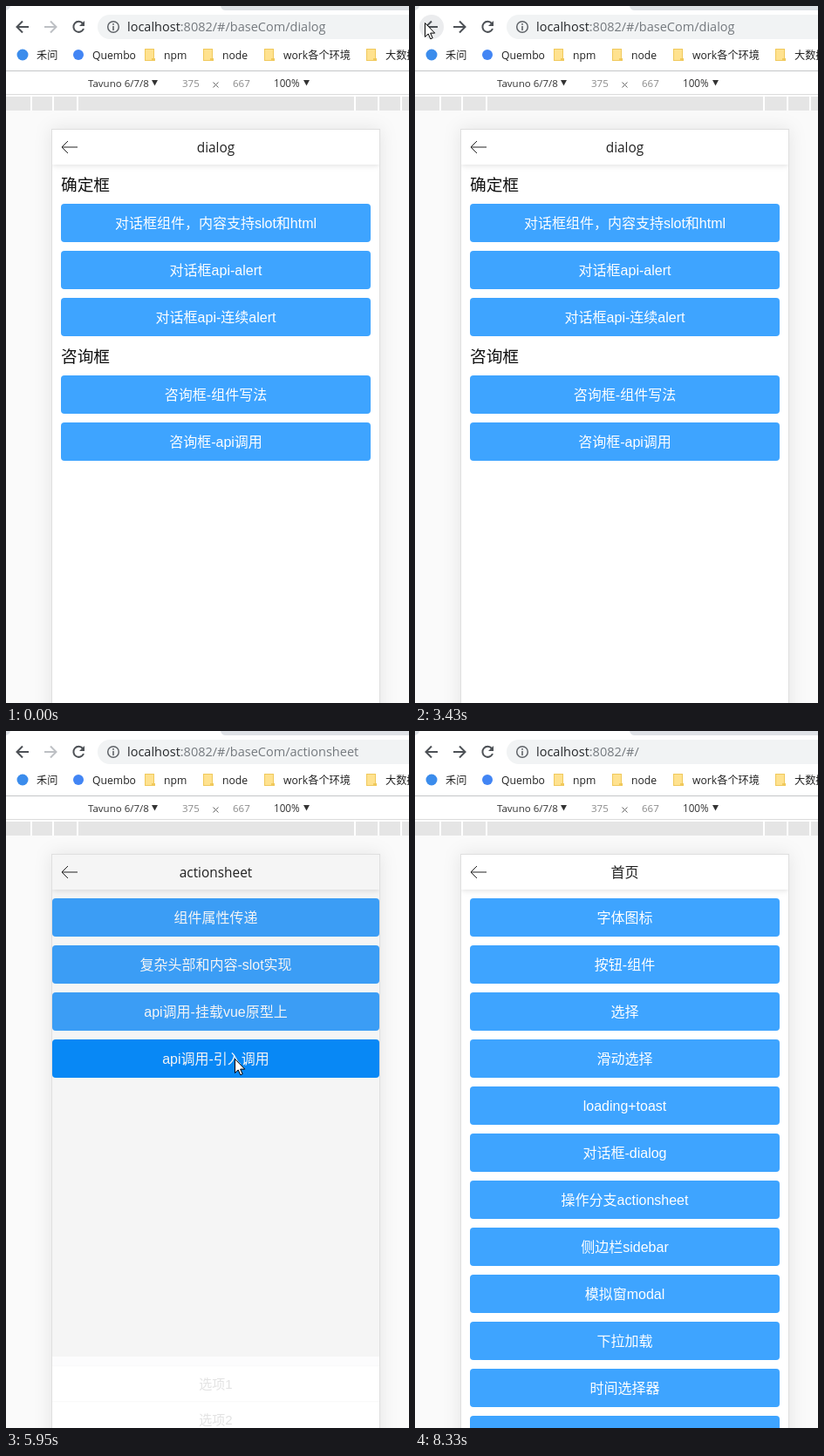
An HTML page for the animation above (9240 ms loop, 462 by 800 pixels).

```html
<!DOCTYPE html>
<html lang="zh">
<head>
<meta charset="utf-8">
<title>dialog</title>
<style>
html, body { margin: 0; width: 100%; height: 100%; overflow: hidden; background: #fff; }
svg { display: block; }
text { font-family: "Liberation Sans", "Noto Sans CJK SC", "Noto Sans CJK", sans-serif; white-space: pre; }
.ui { font-family: "Open Sans", "Noto Sans CJK SC", "Noto Sans CJK", sans-serif; }
.device { filter: drop-shadow(0 0 10px rgba(0,0,0,.09)); }
.header { filter: drop-shadow(0 1px 3px rgba(0,0,0,.13)); }
</style>
</head>
<body>
<svg id="stage" width="462" height="800" viewBox="0 0 462 800"></svg>
<script>
const LOOP = 9240, STEP = 70, FADE = 300, MID = 240.5;
const BLUE = '#3ea4ff', PRESSED = '#098eff';

const rect = (x, y, w, h, fill, extra = '') =>
  `<rect x="${x}" y="${y}" width="${w}" height="${h}" fill="${fill}" ${extra}/>`;
const line = (d, stroke, width = 1, extra = '') =>
  `<path d="${d}" fill="none" stroke="${stroke}" stroke-width="${width}" ${extra}/>`;
const label = (x, y, size, str, fill = '#222', extra = '') =>
  `<text x="${x}" y="${y}" font-size="${size}" fill="${fill}" ${extra}>${str}</text>`;
const ui = (x, y, size, str, fill) => label(x, y, size, str, fill, 'class="ui"');
const centered = (y, size, str, fill, x = MID) =>
  label(x, y, size, str, fill, 'text-anchor="middle"');
const button = (y, str, id = '', x = 63, w = 355) =>
  rect(x, y, w, 44, BLUE, `rx="4" ${id && `id="${id}"`}`) + centered(y + 28, 16, str, '#fff');

function browser() {
  const folder = x => rect(x + .5, 49.5, 10, 13, '#ffe28f', 'stroke="#f0c95c"') +
    rect(x + 8, 60, 4, 3, '#f0c95c');
  const arrow = 'M7 -6.5L.5 0L7 6.5M.5 0H14';
  return rect(0, 0, 462, 120, '#fff') +
    '<path d="M246 0H462V5H252Q247 5 246 0ZM0 0H5Q4 4 0 5Z" fill="#dee1e6"/>' +
    '<circle id="hover" cx="19" cy="24" r="14" fill="#ebecee"/>' +
    line(arrow, '#4d5156', 2, 'transform="translate(12 24)"') +
    line(arrow, '#bdc0c4', 2, 'id="forward" transform="translate(58 24) scale(-1 1)"') +
    line('M88 20A6 6 0 1 0 89 26', '#4d5156', 2) + '<path d="M90 17V23H84Z" fill="#4d5156"/>' +
    rect(105, 10, 380, 28, '#f1f3f4', 'rx="14"') +
    '<circle cx="123" cy="24" r="6.3" fill="none" stroke="#5f6368" stroke-width="1.5"/>' +
    line('M123 20V21.7M123 23V28', '#5f6368', 1.6) +
    ui(139, 29, 14.5, 'localhost<tspan id="path" fill="#74797e"></tspan>', '#24272a') +
    '<circle cx="19" cy="56" r="6.5" fill="#3b8cec"/>' + ui(35, 61, 12.2, '禾问') +
    '<circle cx="83" cy="56" r="6" fill="#4285f4"/>' + ui(99, 61, 12.2, 'Quembo') +
    [159, 226, 296, 413].map(folder).join('') +
    ui(181, 61, 12.2, 'npm') + ui(248, 61, 12.2, 'node') +
    ui(318, 61, 12.2, 'work各个环境') + ui(435, 61, 12.2, '大数据') +
    line('M0 74.5H462', '#c4c6c8') + line('M0 101.5H462', '#dcdcdc') +
    ui(94, 93, 11.5, 'Tavuno 6/7/8', '#333') + ui(202, 93, 11.5, '375', '#8a8a8a') +
    line('M237.5 87.5L243.5 93.5M243.5 87.5L237.5 93.5', '#666') +
    ui(260, 93, 11.5, '667', '#8a8a8a') + ui(307, 93, 11.7, '100%', '#333') +
    '<path d="M167 85H174L170.5 91.5ZM341 85H348L344.5 91.5Z" fill="#333"/>' +
    rect(0, 104, 462, 16, '#e5e5e5') +
    line('M29 104V120M54 104V120M82 104V120M400 104V120M427 104V120M453 104V120', '#fff', 2);
}

function page(id, title, body) {
  return `<g id="${id}">${body}` +
    rect(53, 142, 375, 40, '#fff', 'class="header"') +
    line('M71 155L64 162L71 169M64 162H82', '#222') + title + '</g>';
}
const latinTitle = str =>
  label(MID, 168, 15.4, str, '#222', 'class="ui" text-anchor="middle"');

const homeItems = ['字体图标', '按钮-组件', '选择', '滑动选择', 'loading+toast', '对话框-dialog',
  '操作分支actionsheet', '侧边栏sidebar', '模拟窗modal', '下拉加载', '时间选择器', ''];
const sheetItems = ['组件属性传递', '复杂头部和内容-slot实现', 'api调用-挂载vue原型上', 'api调用-引入调用'];

const dialogPage = page('dialog', latinTitle('dialog'),
  label(63, 212, 18.7, '确定框', '#111') +
  button(227, '对话框组件，内容支持slot和html') + button(281, '对话框api-alert') +
  button(335, '对话框api-连续alert') +
  label(63, 409, 18.7, '咨询框', '#111') +
  button(424, '咨询框-组件写法') + button(478, '咨询框-api调用', 'askButton'));
const homePage = page('home', centered(168, 16, '首页'),
  homeItems.map((s, i) => button(192 + 54 * i, s, i === 6 ? 'sheetLink' : '')).join(''));
const sheetPage = page('actionsheet', latinTitle('actionsheet'),
  sheetItems.map((s, i) => button(192 + 54 * i, s, i === 3 ? 'sheetButton' : '', 53, 375)).join(''));

const shade = rect(53, 142, 375, 658, '#000', 'opacity=".3"');
const box = `<g id="ask">${shade}<g id="askBox">` +
  rect(103, 402, 275, 147, '#fff', 'rx="4"') + centered(428, 16, '提示', '#444') +
  line('M103 442.5H378', '#e4e4e4') + centered(470, 16, '是否继续', '#444') +
  rect(113.5, 494.5, 122, 44, '#fff', 'stroke="#e4e4e4"') + centered(523, 16, '取消', '#444', 174.5) +
  rect(246, 494, 122, 45, BLUE) + centered(523, 16, '确定', '#fff', 307) + '</g></g>';
const sheet = `<g id="sheet">${shade}<g id="sheetBox">` +
  rect(53, 673, 375, 140, '#fff') + rect(53, 673, 375, 10, '#f0f0f3') +
  [0, 1, 2].map(i => line(`M53 ${683.5 + 41 * i}H428`, '#dedede') +
    centered(710 + 41 * i, 15, '选项' + (i + 1), '#333')).join('') + '</g></g>';

document.getElementById('stage').innerHTML =
  rect(0, 119, 462, 681, '#fafafa') +
  rect(52.5, 141.5, 376, 680, '#fff', 'stroke="#dfdfdf" class="device"') +
  '<clipPath id="screen"><rect x="53" y="142" width="375" height="658"/></clipPath>' +
  `<g clip-path="url(#screen)">${dialogPage}${homePage}${sheetPage}${box}${sheet}</g>` + browser() +
  '<path id="cursor" d="M.5 .5V16.5L4.2 13L6.8 18.8L9.2 17.7L6.7 12.1H11.7Z" fill="#fff" stroke="#000"/>';

const el = {};
document.querySelectorAll('[id]').forEach(node => el[node.id] = node);

// CSS "ease" curve, solved by bisection.
function ease(x) {
  if (x <= 0) return 0;
  if (x >= 1) return 1;
  const curve = (a, b, s) => 3 * a * s * (1 - s) ** 2 + 3 * b * s * s * (1 - s) + s ** 3;
  let lo = 0, hi = 1;
  for (let i = 0; i < 24; i++) {
    const s = (lo + hi) / 2;
    if (curve(.25, .25, s) < x) lo = s; else hi = s;
  }
  return curve(.1, 1, lo);
}
const openness = (t, start, end) => ease((t - start) / FADE) - ease((t - end) / FADE);

// Pointer stops: time, x, y.
const stops = [
  [420, 369, 776], [980, 257, 483], [1400, 257, 483], [1610, 206, 428], [1750, 180, 395],
  [2030, 11, 19], [3500, 11, 19], [4130, 275, 518], [4200, 275, 518], [4270, 275, 512],
  [4340, 275, 512], [4480, 270, 529], [4760, 270, 529], [5530, 268, 392], [5740, 262, 376],
  [6160, 262, 376], [6860, 20, 32], [7700, 20, 32], [8330, 372, 800]
];
function pointer(t) {
  const i = stops.findIndex(stop => stop[0] > t);
  if (i < 1) return null;
  const [t0, x0, y0] = stops[i - 1], [t1, x1, y1] = stops[i];
  const k = (t - t0) / (t1 - t0);
  const s = k * k * (3 - 2 * k);
  return [x0 + (x1 - x0) * s, y0 + (y1 - y0) * s].map(Math.round);
}

const show = (node, on) => node.style.display = on ? '' : 'none';
const press = (node, on) => node.setAttribute('fill', on ? PRESSED : BLUE);

function render(t) {
  const current = t < 3500 ? 'dialog' : t < 4690 || t >= 7700 ? 'home' : 'actionsheet';
  for (const name of ['dialog', 'home', 'actionsheet']) show(el[name], name === current);
  el.path.textContent = ':8082/#/' + (current === 'home' ? '' : 'baseCom/' + current);

  const canGoForward = t >= 2310 && t < 4690 || t >= 7700;
  el.forward.setAttribute('stroke', canGoForward ? '#4d5156' : '#bdc0c4');
  press(el.askButton, t >= 1120 && t < 1260);
  press(el.sheetLink, t >= 4620 && t < 4760);
  press(el.sheetButton, t >= 5880 && t < 6020);

  const ask = openness(t, 1117, 2450);
  show(el.ask, ask > 0);
  el.ask.setAttribute('opacity', ask);
  el.askBox.setAttribute('transform',
    `translate(${MID} 475.5) scale(${1 + .46 * (1 - ask)}) translate(${-MID} -475.5)`);

  const up = openness(t, 5913, 7052);
  show(el.sheet, up > 0);
  el.sheet.setAttribute('opacity', up);
  el.sheetBox.setAttribute('transform', `translate(0 ${52 * (1 - up)})`);

  const at = pointer(t);
  show(el.cursor, at);
  if (at) el.cursor.setAttribute('transform', `translate(${at})`);
  show(el.hover, at && Math.hypot(at[0] - 19, at[1] - 24) < 14);
}

const began = performance.now();
function tick() {
  const t = (performance.now() - began) % LOOP;
  render(Math.floor(t / STEP) * STEP);
  requestAnimationFrame(tick);
}
tick();
</script>
</body>
</html>
```
